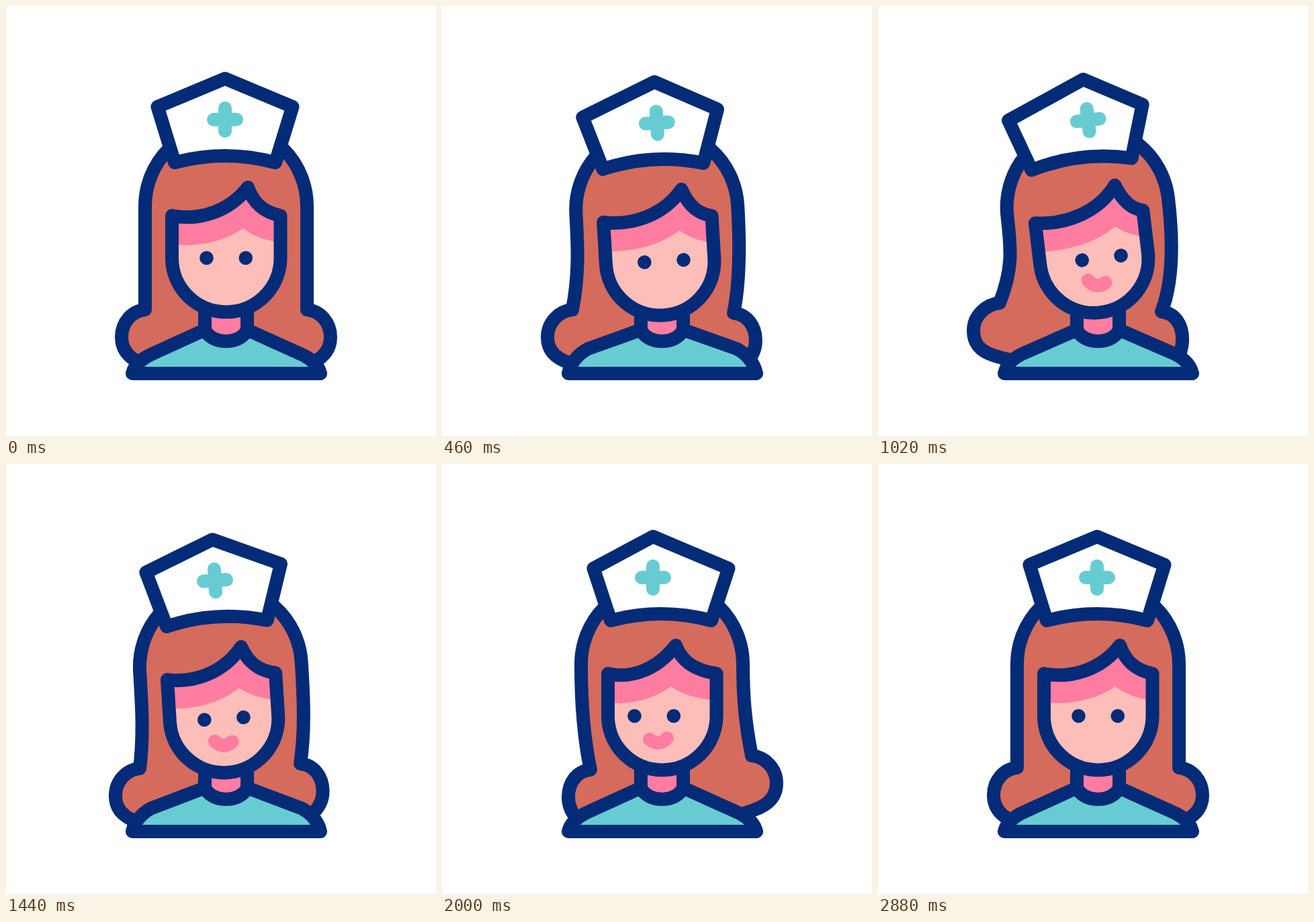
Animation, 640 px wide and 640 px high, one loop 3000 ms. Source, as an HTML page:

```html
<!DOCTYPE html>
<html lang="en">
<head>
<meta charset="utf-8">
<title>Nurse</title>
<style>
  html, body { margin: 0; width: 100%; height: 100%; overflow: hidden; background: #fff; }
  svg { display: block; width: 100%; height: 100%; }
  .line { stroke: #042b77; stroke-width: 20; stroke-linecap: round; stroke-linejoin: round; }
  .hair { fill: #d56b5c; }
  .skin { fill: #fdbeb9; }
  .pink { fill: #ff7da0; }
  .teal { fill: #67ccd1; }
  .white { fill: #fff; }
  .none { fill: none; }
  .eye { fill: #042b77; }
  .cross, .mouth { fill: none; stroke-width: 20; stroke-linecap: round; }
  .cross { stroke: #67ccd1; }
  .mouth { stroke: #ff7da0; }
</style>
</head>
<body>
<svg viewBox="0 0 640 640">
  <path id="hair" class="hair line"/>
  <path class="pink line" d="M296 450V482C306 504.7 349 504.7 359 482V450"/>
  <path id="body" class="teal line"/>
  <g id="head">
    <path id="skin" class="skin"/>
    <path id="shade" class="pink"/>
    <path id="face" class="none line"/>
    <g id="eyes">
      <circle class="eye" cx="298.5" cy="375" r="10.3"/>
      <circle class="eye" cx="356.8" cy="375" r="10.3"/>
    </g>
    <path id="mouth" class="mouth" d="M-13 0Q0 12 13 0"/>
    <path id="cap" class="white line"/>
    <path id="cross" class="cross" d="M326 152V186M309 169H343"/>
  </g>
</svg>
<script>
const LOOP = 3000;
const PIVOT = { x: 327, y: 427 };
const part = {};
document.querySelectorAll('[id]').forEach(el => part[el.id] = el);
const put = (id, name, value) => part[id].setAttribute(name, value);

// Keys are [time, value] pairs, eased by a half cosine.
function eased(keys, t) {
  if (t <= keys[0][0]) return keys[0][1];
  for (let i = 1; i < keys.length; i++) {
    const [t0, a] = keys[i - 1], [t1, b] = keys[i];
    if (t <= t1) return a + (b - a) * (1 - Math.cos(Math.PI * (t - t0) / (t1 - t0))) / 2;
  }
  return keys[keys.length - 1][1];
}

// Smooth curve through the values, flat at peaks and at both ends.
function flowing(times, v, t) {
  const last = times.length - 1;
  if (t <= times[0]) return v[0];
  if (t >= times[last]) return v[last];
  const slope = i => {
    if (i === 0 || i === last || (v[i] - v[i - 1]) * (v[i + 1] - v[i]) <= 0) return 0;
    return (v[i + 1] - v[i - 1]) / (times[i + 1] - times[i - 1]);
  };
  const i = times.findIndex(x => x > t) - 1;
  const h = times[i + 1] - times[i], u = (t - times[i]) / h, w = 1 - u;
  return w * w * (1 + 2 * u) * v[i] + u * u * (3 - 2 * u) * v[i + 1]
    + h * u * w * (w * slope(i) - u * slope(i + 1));
}

const tilt = [[120, 0], [810, -7], [900, -7], [2000, 0]];
const faceTurn = [[120, 0], [810, 12], [900, 12], [1980, -12], [2010, -12], [2420, 0]];
const capTurn = [[120, 0], [810, 19], [860, 19], [1920, -12], [2010, -12], [2420, 0]];
const dip = [[120, 0], [440, 5], [800, 0], [900, 0], [1320, 5], [1700, 0], [2010, 0], [2210, 5], [2420, 0]];
const smile = [[560, 0], [800, 1], [2060, 1], [2300, 0]];

const swayTimes = [120, 460, 1020, 1180, 1440, 1850, 2000, 2440, 2520, 2880];
const sway = {
  left: {
    x: [0, -13, -26, -30, -8, 26, 14, -13, -16, 0],
    y: [0, 0, -10, -12, 1, 3, 3, -17, -17, 0]
  },
  right: {
    x: [0, -14, -26, -29, -10, 25, 13, -13, -15, 0],
    y: [0, 5, 3, 2, -6, -22, -18, 6, 7, 0]
  }
};

const text = p => p.map(n => n.toFixed(2)).join(' ');

// Points of one lock from the shoulder up to the crown, drawn as the left side.
function lock(side, t, onHead) {
  const flip = side === 'right';
  const mirror = ([x, y]) => flip ? [655 - x, y] : [x, y];
  const dx = flowing(swayTimes, sway[side].x, t) * (flip ? -1 : 1);
  const dy = flowing(swayTimes, sway[side].y, t);
  const jx = 207 + dx, jy = 452 + dy;
  const ex = jx - 35 + dx * 0.15, ey = jy + 41;
  const ty = 541 + dy * 0.9;
  const bun = [
    [225, ty], [190 + dx * 0.7, ty - 10], [ex, ey + 24 - dx * 0.4],
    [ex, ey], [ex, ey - 22], [jx - 20, jy + 2], [jx, jy],
    [jx - dx * 0.75, jy - 50]
  ].map(mirror);
  const crown = [[207, 348], [207, 298]].map(p => onHead(mirror(p)));
  return bun.concat(crown);
}

function drawHair(t, angle, drop) {
  const c = Math.cos(angle * Math.PI / 180), s = Math.sin(angle * Math.PI / 180);
  const onHead = ([x, y]) => {
    const a = x - PIVOT.x, b = y - PIVOT.y;
    return [PIVOT.x + a * c - b * s, PIVOT.y + a * s + b * c + drop];
  };
  const left = lock('left', t, onHead).map(text);
  const right = lock('right', t, onHead).map(text).reverse();
  put('hair', 'd', `M${left[0]}C${left.slice(1).join(' ')}A120.5 120.5 0 0 1 ${right[0]}C${right.slice(1).join(' ')}Z`);
}

function drawBody(drop) {
  const x = 213 + drop * 0.9, y = 520 - drop * 2;
  put('body', 'd', `M188 547C191 ${535 - drop} ${x - 12} ${y + 6} ${x} ${y}L296 482C306 504.7 349 504.7 359 482`
    + `L${656 - x} ${y}C${668 - x} ${y + 6} 465 ${535 - drop} 468 547Z`);
}

function drawFace(d) {
  const fringe = `C${288 + d * 0.5} 320 ${332 + d} 306 ${360 + d} 270C${370 + d} 298 ${388 + d * 0.5} 308 408.5 312`;
  const face = `M247 312${fringe}V375A80.75 80.5 0 0 1 247 375Z`;
  put('skin', 'd', face);
  put('face', 'd', face);
  put('shade', 'd', `M247 312${fringe}V352Q${375 + d} 348 ${353 + d} 331C${325 + d} 350 ${290 + d * 0.5} 359 247 355Z`);
  put('eyes', 'transform', `translate(${d} 0)`);
}

function drawCap(d) {
  const y = 150 + Math.min(5.5, Math.abs(d) * 0.45);
  put('cap', 'd', `M251 233L225.5 ${y}L${326 + d} 108L426.5 ${y}L401 233Q326 213 251 233Z`);
  put('cross', 'transform', `translate(${d} 0)`);
}

function drawMouth(d, size) {
  put('mouth', 'visibility', size > 0.01 ? 'visible' : 'hidden');
  put('mouth', 'transform', `translate(${325 + d * 0.25} 409) rotate(${5.3 + d * 0.81}) scale(${size})`);
}

function draw() {
  const t = performance.now() % LOOP;
  const angle = eased(tilt, t), drop = eased(dip, t), turn = eased(faceTurn, t);
  drawHair(t, angle, drop);
  drawBody(drop);
  drawFace(turn);
  drawCap(eased(capTurn, t));
  drawMouth(turn, eased(smile, t));
  put('head', 'transform', `translate(0 ${drop}) rotate(${angle} ${PIVOT.x} ${PIVOT.y})`);
  requestAnimationFrame(draw);
}
draw();
</script>
</body>
</html>
```
